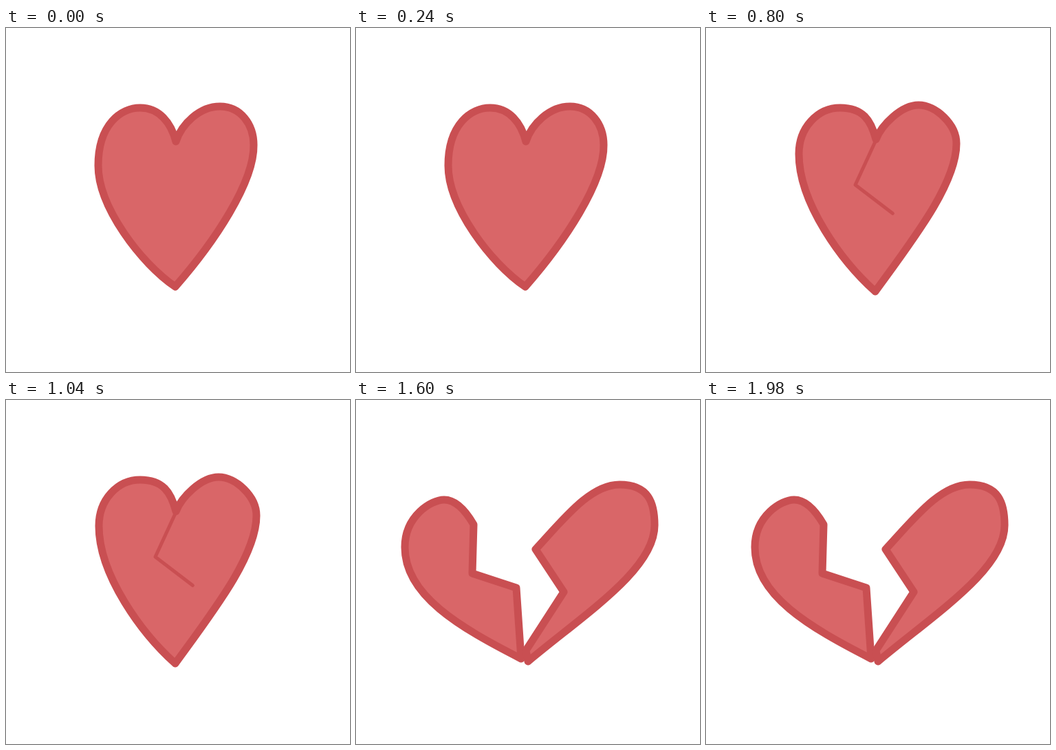
Animation of 500x500 px, one loop 2.24 s. Source, as an HTML page without scripts:

```html
<!DOCTYPE html>
<html lang="en">
<head>
<meta charset="utf-8">
<title>Breaking heart</title>
<style>
  html, body { margin: 0; width: 100%; height: 100%; overflow: hidden; background: #fff; }
  svg { display: block; width: 100%; height: 100%; }
  path { fill: #d96668; stroke: #c94f52; stroke-width: 11; stroke-linecap: round; stroke-linejoin: round; }
  #crack { fill: none; stroke-width: inherit; }

  /* Each pose holds 400 ms of the loop, the last one 640 ms */
  .pose {
    visibility: hidden;
    animation: pose 2240ms step-end calc(var(--i) * 400ms - 2240ms) infinite;
  }
  .last { animation-name: last-pose; }
  @keyframes pose { 0% { visibility: visible; } 17.8572%, 100% { visibility: hidden; } }
  @keyframes last-pose { 0% { visibility: visible; } 28.5715%, 100% { visibility: hidden; } }
</style>
</head>
<body>
<svg viewBox="0 0 500 500">
  <defs>
    <path id="heart" d="M247 165C255 140 281 114 311 114S360 140 360 170C361 224 303 311 246 376C196 342 134 260 134 200S167 116 195 116S240 138 247 165Z"/>
    <path id="crack" d="M247 163L217 228 272 270 241 366"/>
  </defs>

  <g class="pose" style="--i:0">
    <use href="#heart"/>
  </g>

  <!-- the crack grows along one line -->
  <g class="pose" style="--i:1">
    <use href="#heart" transform="translate(0 -2) scale(1 1.01)"/>
    <use href="#crack" stroke-width="5" stroke-dasharray="66 300"/>
  </g>
  <g class="pose" style="--i:2">
    <path d="M247 162C255 141 284 112 309 112S364 140 364 168C364 226 302 306 246 383C198 340 135 255 135 183C135 145 162 116 195 116S240 134 247 162Z"/>
    <use href="#crack" stroke-width="5" stroke-dasharray="140 300"/>
  </g>
  <g class="pose" style="--i:3">
    <path stroke-width="12" d="M246 160C254 138 288 106 315 106S367 128 367 159C370 224 318 306 251 381C205 330 132 262 132 188C132 158 155 113 200 113S234 130 246 160Z"/>
    <use href="#crack" stroke-width="6"/>
  </g>

  <!-- halves fall apart -->
  <g class="pose last" style="--i:4">
    <path d="M171 181C160 162 146 145 128 145S71 168 71 214C71 284 150 330 240 376L233 273 169 252Z"/>
    <path d="M261 217C301 174 340 123 383 123S434 150 434 182C434 246 335 309 250 380L247 364 302 279Z"/>
  </g>
</svg>
</body>
</html>
```
